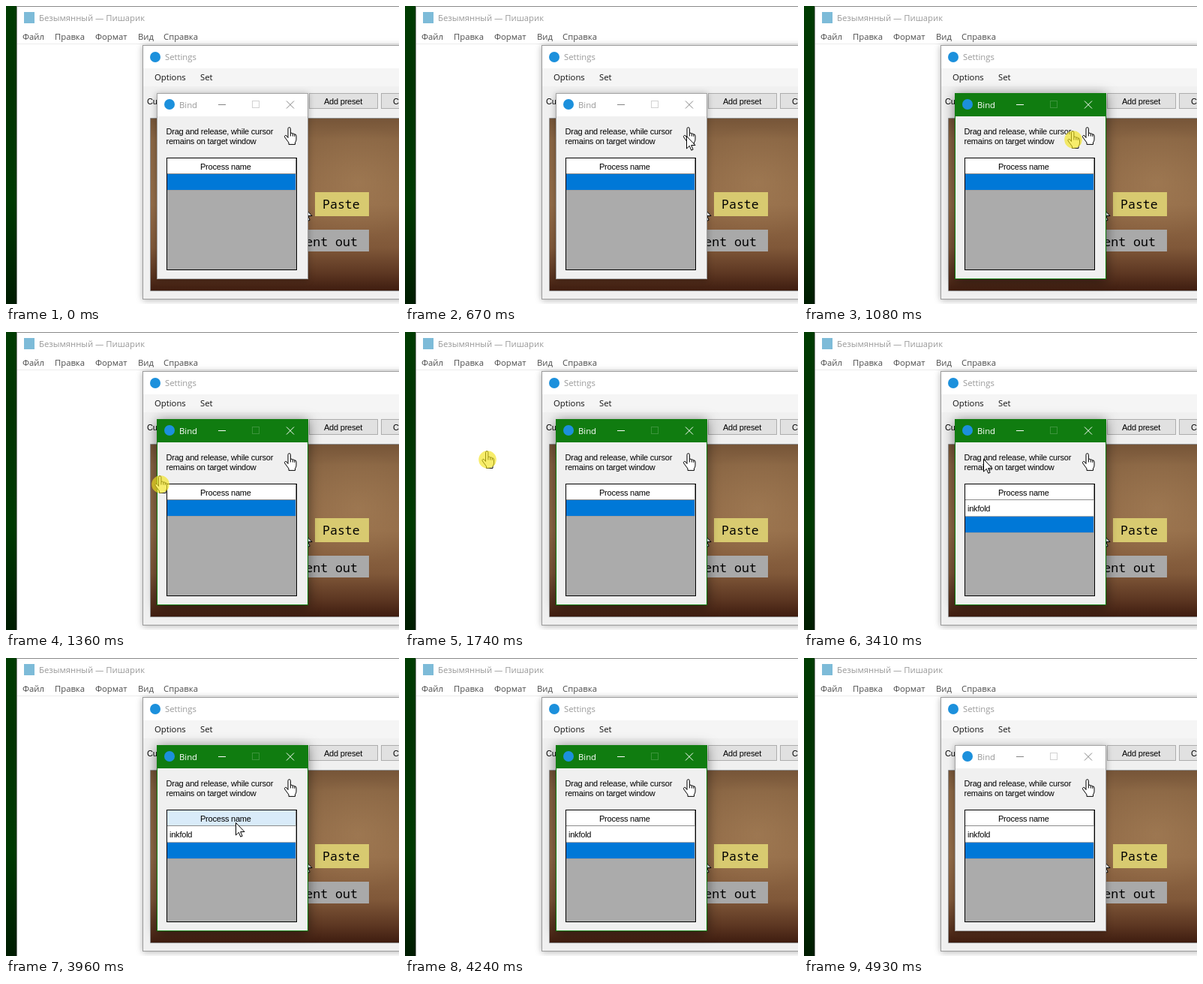
An HTML page that plays this animation: 524 px wide and 397 px high, repeating every 5.03 s.

```html
<!DOCTYPE html>
<html lang="en">
<head>
<meta charset="utf-8">
<title>Bind a window</title>
<style>
  html, body { margin: 0; height: 100%; overflow: hidden; background: #fff; }
  svg { display: block; }
  text { font: 11.3px "Open Sans", sans-serif; fill: #111; white-space: pre; }
  .dim { fill: #999; }
  .menu { fill: #4d4d4d; }
  .form { font: 11px "Liberation Sans", Arial, sans-serif; letter-spacing: -.22px; fill: #000; }
  .mono { font: 16.6px "Noto Sans Mono", monospace; fill: #000; }
  .button { fill: #e1e1e1; stroke: #adadad; }
  .back { filter: drop-shadow(0 1px 4px rgba(0, 0, 0, .3)); }
  .pointer { fill: #fff; stroke: #000; stroke-linejoin: round; }

  #bind { --bar: #fff; --edge: #a3a3a3; --title: #999; --glyph: #858585; --faint: #d2d2d2; }
  #bind.active { --bar: #107c10; --edge: #107c10; --title: #fff; --glyph: #fff; --faint: #3c943c; }
  #bind.active .back { filter: drop-shadow(0 2px 8px rgba(0, 0, 0, .5)); }
  #bind .back { fill: #f0f0f0; stroke: var(--edge); }
  #bar { fill: var(--bar); }
  #title { fill: var(--title); }
  .glyph { fill: none; stroke: var(--glyph); }
</style>
</head>
<body>
<svg width="524" height="397" viewBox="0 0 524 397">
  <defs>
    <linearGradient id="desk" x2="0" y2="1">
      <stop stop-color="#003c02"/><stop offset=".25" stop-color="#023303"/>
      <stop offset=".65" stop-color="#003a02"/><stop offset="1" stop-color="#001c01"/>
    </linearGradient>
    <linearGradient id="leather" x2="0" y2="1">
      <stop stop-color="#765538"/><stop offset=".12" stop-color="#8a6644"/>
      <stop offset=".5" stop-color="#936c48"/><stop offset=".75" stop-color="#805839"/>
      <stop offset=".9" stop-color="#5d3722"/><stop offset="1" stop-color="#3f1d10"/>
    </linearGradient>
    <radialGradient id="glow">
      <stop stop-color="#b08a60" stop-opacity=".4"/><stop offset="1" stop-color="#b08a60" stop-opacity="0"/>
    </radialGradient>
    <path id="arrow" class="pointer" d="M.5 .5V17L4.3 13.3 6.8 19.2 9.1 18.2 6.7 12.5H12Z"/>
    <g id="hand" class="pointer">
      <path d="M5.5 15V3a1.7 1.7 0 0 1 3.4 0v6q1.6-1 2.9.6 1.6-.6 2.5.8 2.2-.2 2.2 2v5q0 2-1.5 4v2.5H6.5V21.5L1.3 14.5q-1-2 .6-2.6t3.6 3z"/>
      <path d="M8.9 9v4M11.8 9.6v3.5M14.3 10.4v3" fill="none"/>
    </g>
  </defs>

  <!-- Desktop and text editor -->
  <rect width="15" height="397" fill="url(#desk)"/>
  <rect x="14.5" y=".5" width="530" height="410" fill="#fff" stroke="#8a8a8a"/>
  <rect x="24" y="8" width="14" height="15" fill="#7dbbd8"/>
  <text class="dim" x="44" y="20">Безымянный — Пишарик</text>
  <g>
    <text class="menu" x="22" y="45">Файл</text>
    <text class="menu" x="65" y="45">Правка</text>
    <text class="menu" x="119" y="45">Формат</text>
    <text class="menu" x="176" y="45">Вид</text>
    <text class="menu" x="210" y="45">Справка</text>
  </g>
  <path d="M15 50.5H524" stroke="#ececec"/>

  <!-- Settings window -->
  <rect class="back" x="182.5" y="52.5" width="400" height="338" fill="#f0f0f0" stroke="#9a9a9a"/>
  <rect x="183" y="53" width="341" height="30" fill="#fff"/>
  <rect x="183" y="83" width="341" height="24" fill="#f5f5f5"/>
  <circle cx="199" cy="68" r="7" fill="#1c90dc"/>
  <text class="dim" x="212" y="72">Settings</text>
  <text x="198" y="99">Options</text>
  <text x="259" y="99">Set</text>
  <text class="form" x="188" y="131">Current</text>
  <rect x="264.5" y="116.5" width="122" height="21" fill="#fff" stroke="#7a7a7a"/>
  <rect class="button" x="404.5" y="116.5" width="91" height="20"/>
  <rect class="button" x="500.5" y="116.5" width="91" height="20"/>
  <text class="form" x="424" y="131">Add preset</text>
  <text class="form" x="516" y="131">Clear</text>
  <rect x="193" y="150" width="340" height="229" fill="url(#leather)"/>
  <ellipse cx="470" cy="235" rx="90" ry="75" fill="url(#glow)"/>
  <path d="M524 149.5H192.5V379.5H524" fill="none" stroke="#8d8d8d"/>
  <rect x="412" y="248" width="72" height="32" fill="#d8ca70"/>
  <text class="mono" x="422" y="270">Paste</text>
  <rect x="349" y="298" width="135" height="29" fill="#a9a9a9"/>
  <text class="mono" x="469" y="320" text-anchor="end">Comment out</text>
  <use href="#arrow" x="396" y="267"/>

  <!-- Bind window -->
  <g id="bind">
    <rect class="back" x="201.5" y="116.5" width="201" height="247"/>
    <rect id="bar" x="202" y="117" width="200" height="30"/>
    <circle cx="218" cy="131" r="7" fill="#1c90dc"/>
    <text id="title" x="231" y="136">Bind</text>
    <path class="glyph" d="M283 131.5h10M374 126.5l10 10m0-10l-10 10"/>
    <rect class="glyph" x="328.5" y="126.5" width="9" height="9" style="stroke:var(--faint)"/>
    <text class="form" x="213.500" y="171">Drag and release, while cursor</text>
    <text class="form" x="213.500" y="184">remains on target window</text>
    <use href="#hand" x="370.5" y="160.5"/>

    <rect x="214.500" y="202.500" width="173" height="149" fill="#ababab" stroke="#000"/>
    <rect id="header" x="215" y="203" width="171" height="20" fill="#fff"/>
    <text class="form" x="259" y="218">Process name</text>
    <path d="M215 223.500H386.500V203" fill="none" stroke="#8c8c8c"/>
    <g id="entry">
      <rect x="215" y="224" width="171" height="21" fill="#fff"/>
      <text class="form" x="218" y="239">inkfold</text>
    </g>
    <g id="selected">
      <rect x="215" y="224" width="171" height="21" fill="#0078d7"/>
      <path d="M215 245.500H386.500V224" fill="none" stroke="#a0a0a0"/>
    </g>
  </g>

  <g id="cursor">
    <use id="idle" href="#arrow"/>
    <g id="drag">
      <use href="#hand" x="-8" y="-12.500"/>
      <circle r="11.800" fill="#f3e31c" opacity=".65"/>
    </g>
  </g>
</svg>
<script>
const LOOP = 5030, GRAB = 900, DROP = 2110, BLUR = 4930;
const $ = id => document.getElementById(id);
const easeIn = power => u => u ** power;
const easeOut = power => u => 1 - (1 - u) ** power;

// Pointer strokes: start, end, steps, easing, then a quadratic curve.
const strokes = [
  [80, 590, 12, easeOut(1.7), [430, 400], [385, 290], [375, 178]],
  [620, 670, 2, easeIn(1), [375, 178], [375, 175], [375, 173]],
  [GRAB, 1410, 11, easeIn(2.5), [376, 173], [268, 207], [160, 203]],
  [1460, 1740, 7, easeOut(1.8), [160, 203], [125, 180], [109.5, 170]],
  [2800, 3310, 12, easeIn(1.4), [109, 170], [160, 160], [214, 167]],
  [3360, 3590, 6, easeOut(1.2), [214, 167], [247, 166], [280, 184]],
  [3910, 4240, 8, easeIn(1.3), [280, 184], [360, 290], [440, 412]],
];

function pointerAt(t) {
  const stroke = strokes.filter(([start]) => t >= start).pop();
  if (!stroke) return strokes[0][4];
  const [start, end, steps, ease, from, via, to] = stroke;
  const step = Math.floor((t - start) / (end - start) * (steps - 1) + 1e-6) + 1;
  const s = ease(Math.min(step / steps, 1)), r = 1 - s;
  return from.map((p, i) => Math.round(r * r * p + 2 * r * s * via[i] + s * s * to[i]));
}

const show = (id, on) => $(id).setAttribute('visibility', on ? 'visible' : 'hidden');

function draw(now) {
  const t = now % LOOP;
  const [x, y] = pointerAt(t);
  const dragging = t >= GRAB && t < DROP;
  const bound = t >= DROP;
  const hover = !dragging && x > 215 && x < 386 && y >= 203 && y < 223;

  $('cursor').setAttribute('transform', `translate(${x} ${y})`);
  show('drag', dragging);
  show('idle', !dragging);
  show('entry', bound);
  $('selected').setAttribute('transform', `translate(0 ${bound ? 22 : 0})`);
  $('header').setAttribute('fill', hover ? '#d9ebf9' : '#fff');
  $('bind').classList.toggle('active', t >= GRAB && t < BLUR);
  requestAnimationFrame(draw);
}
draw(0);
</script>
</body>
</html>
```
